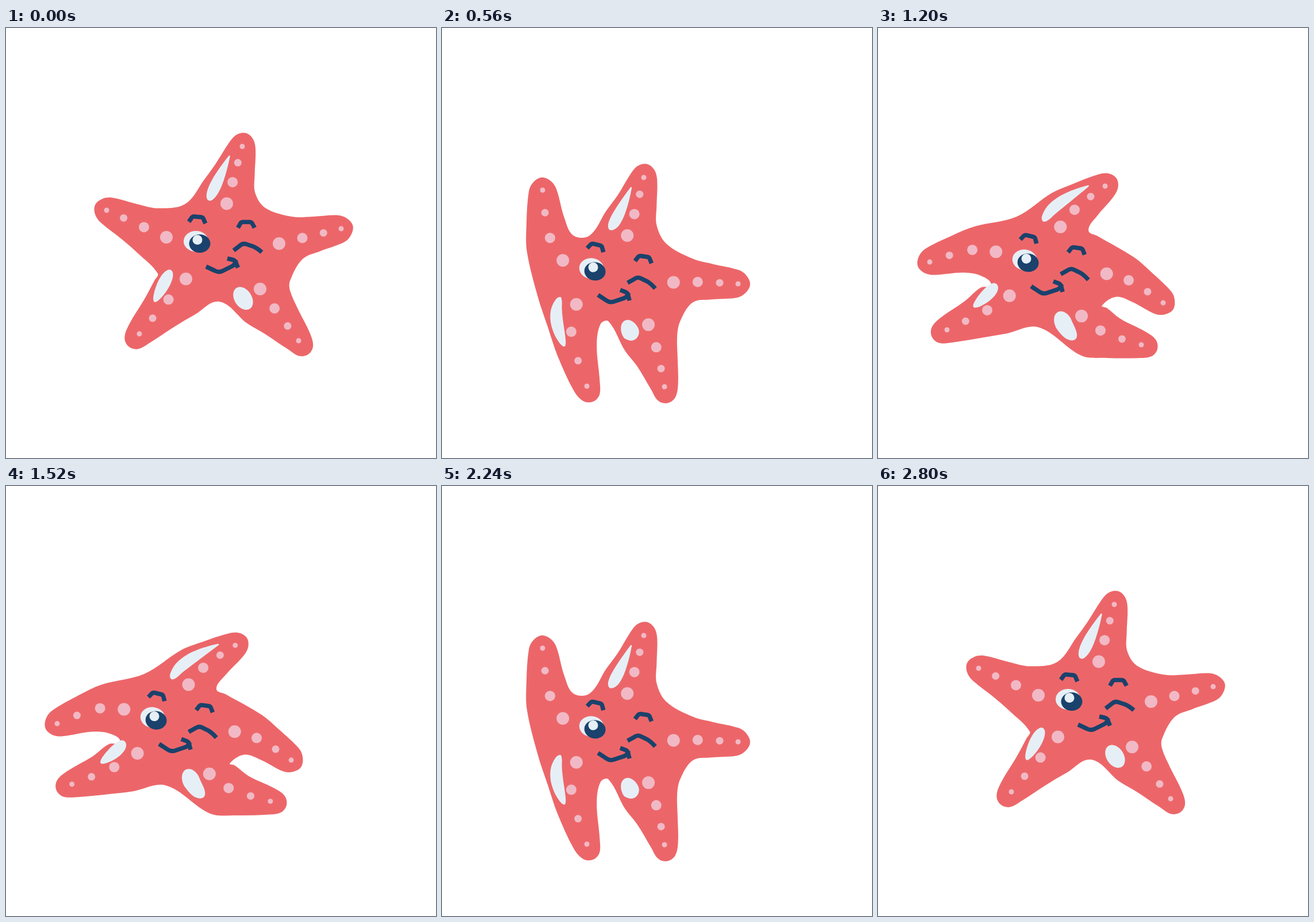
Recreate the animation shown at these times as an HTML page with a canvas. Size 748 px wide and 748 px high, loop 2.88 s.

```html
<!DOCTYPE html>
<html lang="en">
<head>
<meta charset="utf-8">
<title>Winking starfish</title>
<style>
html, body { margin: 0; width: 100%; height: 100%; overflow: hidden; background: #fff; }
canvas { display: block; width: 100%; height: 100%; }
</style>
</head>
<body>
<canvas id="stage" width="748" height="748"></canvas>
<script>
const ctx = document.getElementById('stage').getContext('2d');
const CORAL = '#ec6669', PINK = '#f1b9c5', PALE = '#e6eff6', NAVY = '#1a426c';

// Pose: body centre x, y, turn in degrees, then the tip dot of each arm, clockwise from the top.
const rest = [379,387,0, 411,206, 583,349, 509,544, 232,532, 175,317];
const raised = [341,422,8.5, 390,248, 535,358, 410,615, 218,584, 210,264];
const standing = [306,441,8, 351,260, 515,445, 387,624, 252,623, 175,282];
const sinking = [301,431,6.5, 362,256, 495,488, 442,574, 167,581, 99,351];
const crouched = [301,426,8, 395,275, 496,478, 458,551, 120,525, 90,407];
const lowest = crouched.map((v, i) => v + 0.15 * (v - sinking[i]));
const keys = [[0, rest], [3, raised], [7, standing], [12, sinking], [15, crouched], [17, lowest]];

// Arm: first dot, reach of the tip past the last dot, extra root width on both sides,
// and the pit between this arm and the next.
const arms = [
  { base: [384, 305.5], reach: 24, flare: [12, 4], pit: [451, 313] },
  { base: [475, 375], reach: 21, flare: [0, -6], pit: [494, 440] },
  { base: [442, 454], reach: 29, flare: [0, 20], pit: [371, 476] },
  { base: [313, 436.5], reach: 29, flare: [17, 0], pit: [264, 427] },
  { base: [279, 364], reach: 22, flare: [8, 0], pit: [312, 306] }
];
const tipOf = (pose, i) => pose.slice(3 + 2 * (i % 5), 5 + 2 * (i % 5));
const distance = ([a, b], [c, d]) => Math.hypot(c - a, d - b);
const gapAfter = (pose, i) => distance(tipOf(pose, i), tipOf(pose, i + 1));
arms.forEach((arm, i) => {
  const tip = tipOf(rest, i);
  arm.length = distance(arm.base, tip);
  arm.dir = tip.map((v, k) => (v - arm.base[k]) / arm.length);
});

const dots = [[0, 11], [0.375, 9], [0.715, 6.5], [1, 4.5]]; // place along the arm, radius
const widths = [[0.3, 40], [0.6, 32], [1, 24]];             // place along the arm, half width

// Cubic interpolation through the key poses.
function poseAt(step) {
  let i = 0;
  while (i < keys.length - 2 && step >= keys[i + 1][0]) i++;
  const key = n => keys[Math.max(0, Math.min(keys.length - 1, n))];
  const [ta, a] = key(i - 1), [tb, b] = key(i), [tc, c] = key(i + 1), [td, d] = key(i + 2);
  const h = tc - tb, s = (step - tb) / h;
  return b.map((v, n) => {
    const w = c[n];
    const m0 = (w - a[n]) / (tc - ta) * h;
    const m1 = (d[n] - v) / (td - tb) * h;
    return v + s * (m0 + s * (3 * (w - v) - 2 * m0 - m1 + s * (2 * (v - w) + m0 + m1)));
  });
}

const rotate = ([x, y], angle) => [
  x * Math.cos(angle) - y * Math.sin(angle),
  x * Math.sin(angle) + y * Math.cos(angle)];

function placeOnBody(pose, [x, y]) {
  const [dx, dy] = rotate([x - rest[0], y - rest[1]], pose[2] * Math.PI / 180);
  return [pose[0] + dx, pose[1] + dy];
}

// Maps (along, across) on a straight arm to the stage. The bent arm is a quadratic
// curve that leaves the body in its resting direction and ends at the tip dot.
function bendArm(pose, i) {
  const { base, dir, length } = arms[i];
  const from = placeOnBody(pose, base), to = tipOf(pose, i);
  const out = rotate(dir, pose[2] * Math.PI / 180);
  const mid = from.map((v, k) => v + out[k] * distance(from, to) / 4);
  return (along, across) => {
    const s = Math.max(0, Math.min(1, along / length));
    const t = (Math.sqrt(1 + 8 * s) - 1) / 2; // even spacing along the curve
    const slope = from.map((v, k) => (1 - t) * (mid[k] - v) + t * (to[k] - mid[k]));
    const [tx, ty] = slope.map(v => v / Math.hypot(...slope));
    const past = along - s * length;
    const [x, y] = from.map((v, k) => (1 - t) ** 2 * v + 2 * t * (1 - t) * mid[k] + t * t * to[k]);
    return [x + tx * past - ty * across, y + ty * past + tx * across];
  };
}

function armOutline(i, bend) {
  const { length, reach, flare } = arms[i];
  const side = (sign, extra) => [
    ...widths.map(([s, w]) => bend(s * length, sign * (w + extra * (1 - s)))),
    bend(length + reach - 7, sign * 15)];
  return [...side(-1, flare[0]), bend(length + reach, 0), ...side(1, flare[1]).reverse()];
}

// A pit sinks towards the body as its two arms close in.
function pitPoint(pose, i) {
  const [x, y] = placeOnBody(pose, arms[i].pit);
  const dx = pose[0] - x, dy = pose[1] - y;
  const sink = 35 * (1 - gapAfter(pose, i) / gapAfter(rest, i)) / Math.hypot(dx, dy);
  return [x + dx * sink, y + dy * sink];
}

// Tapered shine between two points in arm coordinates.
function shine(bend, [a0, o0], [a1, o1], width, taper) {
  const da = (a1 - a0) / 2, dO = (o1 - o0) / 2, half = Math.hypot(da, dO);
  return Array.from({ length: 14 }, (_, n) => {
    const c = Math.cos(n * Math.PI / 7), s = Math.sin(n * Math.PI / 7);
    const w = width * s * (1 - taper * c) / half;
    return bend(a0 + da * (1 + c) - dO * w, o0 + dO * (1 + c) + da * w);
  });
}

function fillCurve(points, color) {
  const n = points.length, at = i => points[(i + n) % n];
  const handle = (i, dir) => {
    const before = at(i - 1), after = at(i + 1);
    const k = dir * distance(at(i), at(i + dir)) / 3 / (distance(before, after) || 1);
    return [at(i)[0] + k * (after[0] - before[0]), at(i)[1] + k * (after[1] - before[1])];
  };
  ctx.beginPath();
  ctx.moveTo(...points[0]);
  for (let i = 0; i < n; i++) {
    ctx.bezierCurveTo(...handle(i, 1), ...handle(i + 1, -1), ...at(i + 1));
  }
  ctx.fillStyle = color;
  ctx.fill();
}

function ellipse(color, x, y, rx, ry = rx) {
  ctx.beginPath();
  ctx.ellipse(x, y, rx, ry, 0, 0, 2 * Math.PI);
  ctx.fillStyle = color;
  ctx.fill();
}

const brow = new Path2D('M-14.5 10 L-10 2 Q-8.5 0 -6 0 L6 0 Q8.5 0 10 2 L14.5 10');
const wink = new Path2D('M396 387 L407 378.5 Q412 374 418 376 L430 380 Q437 383 445 390');
const smile = new Path2D('M348 415 L364 422.5 Q371 426 378 422 L394 414 Q399 411 400 404');
const cheek = new Path2D('M385 401 L394 403 Q398 404 399.5 407 L403.5 417');

function drawBrow(x, y, tilt) {
  ctx.save();
  ctx.translate(x, y);
  ctx.rotate(tilt);
  ctx.stroke(brow);
  ctx.restore();
}

function drawFace([x, y, turn]) {
  ctx.save();
  ctx.translate(x, y);
  ctx.rotate(turn * Math.PI / 180);
  ctx.translate(-rest[0], -rest[1]);
  ellipse(PALE, 330.5, 371, 21.5, 18);
  ellipse(NAVY, 337, 375, 18.5, 16);
  ellipse(PALE, 333, 368.5, 8.5);
  ctx.strokeStyle = NAVY;
  ctx.lineWidth = 7.5;
  ctx.lineJoin = 'round';
  drawBrow(333.5, 328.5, 0.1);
  drawBrow(418, 337.5, 0);
  [wink, smile, cheek].forEach(path => ctx.stroke(path));
  ctx.restore();
}

function draw(step) {
  const pose = poseAt(step);
  const bends = arms.map((_, i) => bendArm(pose, i));
  ctx.fillStyle = '#fff';
  ctx.fillRect(0, 0, 748, 748);
  fillCurve(bends.flatMap((bend, i) => [...armOutline(i, bend), pitPoint(pose, i)]), CORAL);
  bends.forEach((bend, i) => dots.forEach(([s, r]) =>
    ellipse(PINK, ...bend(s * arms[i].length, 0), r)));
  fillCurve(shine(bends[0], [-3, -32], [82, -17], 9, 0.55), PALE);
  fillCurve(shine(bends[3], [5, 30], [66, 16], 10.5, 0.2), PALE);
  fillCurve(shine(bends[2], [-26, 32], [17, 35], 15, 0), PALE);
  drawFace(pose);
}

const start = performance.now();
let shown = -1;
function tick() {
  // 36 steps of 80 ms, there and back
  const n = Math.floor((performance.now() - start) / 80) % 36;
  const step = Math.min(n, 35 - n);
  if (step !== shown) draw(shown = step);
  requestAnimationFrame(tick);
}
tick();
</script>
</body>
</html>
```
